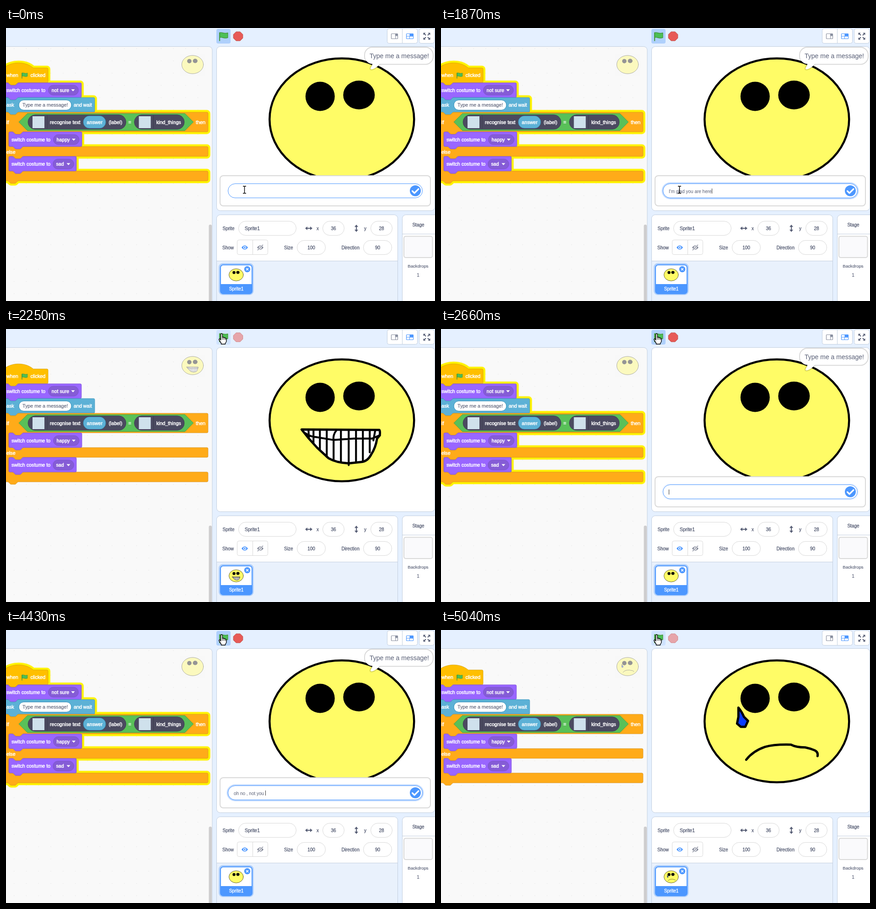
Write an HTML page with a canvas that moves like this. It is 938 by 597 pixels and loops after 5600 ms.

```html
<!DOCTYPE html>
<html lang="en">
<head>
<meta charset="utf-8">
<title>Message face</title>
<style>
html, body { margin: 0; width: 100%; height: 100%; overflow: hidden; background: #e5f0ff; }
canvas { display: block; }
</style>
</head>
<body>
<canvas id="stage" width="938" height="597"></canvas>
<script>
const ctx = document.getElementById('stage').getContext('2d');
const LOOP = 5600;
const FONT = '"Liberation Sans", Arial, sans-serif';
const BLUE = '#4c97ff', INK = '#575e75', EDGE = '#c3cfdf', LINE = '#d9d9d9';

// ---- timing ----
const HAPPY = 1950, RESTART = 2660, SAD = 4900;
const FIRST = [[70, 560, 7, "I'm gl"], [650, 1150, 7, 'ad you '], [1220, 1780, 8, 'are her'], [1870, 1870, 1, 'e']];
const SECOND = [[3170, 3170, 1, 'o'], [3260, 3800, 8, 'h no , '], [3870, 4430, 8, 'not you '], [4520, 4830, 5, 'again']];

// Number of evenly spaced steps reached at time t
function stepsDone(t, from, to, n) {
  if (t < from) return 0;
  if (n < 2) return n;
  return Math.min(n, 1 + Math.floor((t - from) / (to - from) * (n - 1) + 0.12));
}

function typed(t, runs) {
  return runs.map(([from, to, n, s]) =>
    s.slice(0, Math.max(0, stepsDone(t, from, to, n) - (n - s.length)))).join('');
}

// ---- drawing helpers ----
function paint(path, fill, stroke, width = 1) {
  if (fill) { ctx.fillStyle = fill; ctx.fill(path); }
  if (stroke) { ctx.strokeStyle = stroke; ctx.lineWidth = width; ctx.stroke(path); }
}

function box(x, y, w, h, r, fill, stroke, width) {
  const p = new Path2D();
  p.roundRect(x, y, w, h, r);
  paint(p, fill, stroke, width);
}

function oval(x, y, rx, ry, fill, stroke, width) {
  const p = new Path2D();
  p.ellipse(x, y, rx, ry, 0, 0, 7);
  paint(p, fill, stroke, width);
}

function shape(d, fill, stroke, width) {
  paint(new Path2D(d), fill, stroke, width);
}

function at(x, y, scale, draw) {
  ctx.save();
  ctx.translate(x, y);
  ctx.scale(scale, scale);
  draw();
  ctx.restore();
}

function text(s, x, cy, size, color, { align = 'left', heavy = 0 } = {}) {
  ctx.font = `${size}px ${FONT}`;
  ctx.textAlign = align;
  ctx.fillStyle = ctx.strokeStyle = color;
  ctx.fillText(s, x, cy + size * 0.35);
  if (heavy) {
    ctx.lineWidth = heavy;
    ctx.strokeText(s, x, cy + size * 0.35);
  }
}

const uiText = (s, x, cy, align = 'left', size = 10) => text(s, x, cy, size, INK, { align, heavy: 0.35 });
const blockText = (s, x, cy) => text(s, x, cy, 10.72, '#fff', { heavy: 0.5 });

function flag(x, y, scale) {
  at(x, y, scale, () => {
    shape('M2 3C6 0 10 6 19 3V13C10 16 6 10 2 13z', '#4cbf56', '#45993d', 1.3);
    shape('M2 2V20', null, '#45993d', 2);
  });
}

// ---- script blocks, in block units ----
const U = 0.67, LEFT = -4.7;
const NOTCH = 'c2 0 3 1 4 2l4 4c1 1 2 2 4 2h12c2 0 3-1 4-2l4-4c1-1 2-2 4-2';
const TAB = 'c-2 0-3 1-4 2l-4 4c-1 1-2 2-4 2h-12c-2 0-3-1-4-2l-4-4c-1-1-2-2-4-2';
const TOP = 'M0 4a4 4 0 0 1 4-4h8' + NOTCH;
const END = 'a4 4 0 0 1-4 4H48' + TAB + 'H4a4 4 0 0 1-4-4z';
const right = (w, down) => `H${w - 4}a4 4 0 0 1 4 4v${down}`;
const stack = w => TOP + right(w, 40) + END;
const hat = w => 'M0 0c25-22 71-22 96 0' + right(w, 40) + END;
const mouthGap = 'a4 4 0 0 1-4 4H64' + TAB + 'H20a4 4 0 0 0-4 4v40a4 4 0 0 0 4 4h8' + NOTCH;
const ifElse = w => TOP + right(w, 56) + mouthGap + right(w, 24) + mouthGap + right(w, 24) + END;
const units = px => px / U;

const PURPLE = ['#9966ff', '#774dcb'];
const BLOCKS = [
  [LEFT, 87.3, hat(units(96.7)), '#ffbf00', '#cc9900'],
  [LEFT, 119.8, stack(units(169.7)), ...PURPLE],
  [LEFT, 152, stack(units(198.7)), '#5cb1d6', '#2e8eb8'],
  [LEFT, 184.2, ifElse(units(446.5)), '#ffab19', '#cf8b17'],
  [6, 227.1, stack(units(160)), ...PURPLE],
  [6, 280.7, stack(units(148)), ...PURPLE]
];

// All blocks as one path, so that the soft glow does not add up
const OUTLINE = new Path2D();
for (const [x, y, d] of BLOCKS) OUTLINE.addPath(new Path2D(d), new DOMMatrix([U, 0, 0, U, x, y]));

function drawGlow() {
  paint(OUTLINE, null, 'rgba(255,242,0,0.4)', 10.8);
  paint(OUTLINE, null, '#fff200', 9.2);
}

function dropdown(x, cy, w, label) {
  box(x, cy - 11, w, 22, 11, '#855cd6', '#774dcb', 0.7);
  blockText(label, x + 7, cy);
  const tip = x + w - 12;
  shape(`M${tip - 4} ${cy - 2}h8l-4 4.5z`, '#fff');
}

function modelPill(x, w) {
  box(x, 189.8, w, 31.8, 15.9, '#4b4a60', '#3a394c', 0.7);
  box(x + 10, 193, 26, 26, 0, '#cfe1ec');
  shape(`M${x + 42} 191v29`, null, '#3c3b4e');
}

function drawBlocks(glow) {
  ctx.lineJoin = 'round';
  if (glow) drawGlow();
  for (const [x, y, d, fill, edge] of BLOCKS) at(x, y, U, () => shape(d, fill, edge, 1));

  blockText('when', 1, 103.5);
  flag(33.5, 96.5, 0.7);
  blockText('clicked', 53.5, 103.5);

  blockText('switch costume to', 1, 136);
  dropdown(92.5, 136, 66, 'not sure');

  blockText('ask', 1, 168.3);
  box(28, 157.5, 115, 22, 11, '#fff', '#2e8eb8', 1);
  text('Type me a message!', 36, 168.3, 10.72, INK, { heavy: 0.15 });
  blockText('and wait', 148, 168.3);

  blockText('if', 1, 206);
  shape('M28 205.6L46.8 186.9H391.2L409.8 205.6L391.2 224.4H46.8z', '#59c059', '#389438', 0.7);
  modelPill(48, 214.5);
  modelPill(280.5, 109.5);
  blockText('recognise text', 96, 206);
  box(169, 192.3, 49, 26.8, 13.4, '#5cb1d6', '#2e8eb8', 0.7);
  blockText('answer', 176.5, 206);
  blockText('(label)', 224.5, 206);
  blockText('=', 267.5, 206);
  blockText('kind_things', 328.5, 206);
  blockText('then', 415, 206);

  blockText('switch costume to', 12, 244);
  dropdown(103.5, 244, 56.5, 'happy');
  blockText('else', 1, 271);
  blockText('switch costume to', 12, 297.5);
  dropdown(102.5, 297.5, 46, 'sad');
}

// ---- the face, in stage pixels around its centre ----
function happyMouth() {
  shape('M-88 20L82 21Q84 24 83 33L77 40Q74 60 64 75Q56 90 43 91L15 94Q-12 93-29 83L-54 60L-72 40z', '#fff', '#000', 5);
  shape('M-80 28Q-70 36-54 37L-18 43L26 40L66 40L82 33M-73 21L-72 38M-62 22V50M-48 22V64M-33 22V80'
    + 'M-12 22Q-20 32-18 44V88M-2 22V92M15 22V98M31 22V92M46 22V88M61 22V70M73 22L69 44', null, '#000', 4.2);
}

function sadMouth() {
  shape('M-67 84Q-52 65-26 56Q-6 50 31 51Q42 57 62 57Q72 59 82 63Q91 67 89 76', null, '#000', 5);
  shape('M-84-30Q-76-20-72-10L-63-1L-69 12H-79L-87 5L-84-10z', '#0a3cff', '#000', 5);
}

function face(x, y, scale, mood, line = 4.5) {
  at(x, y, scale, () => {
    ctx.lineCap = ctx.lineJoin = 'round';
    oval(0, 0, 158, 133.3, '#fffc66', '#000', line);
    oval(-47.5, -50.2, 32, 32, '#000');
    oval(37.5, -53.2, 34.5, 31.5, '#000');
    if (mood === 'happy') happyMouth();
    if (mood === 'sad') sadMouth();
    ctx.lineCap = 'butt';
  });
}

// Faded as one picture so that overlapping parts do not add up
function fadedFace(mood) {
  face(408, 80, 0.15, mood, 5);
  ctx.globalAlpha = 0.6;
  ctx.fillStyle = '#f9f9f9';
  ctx.fillRect(380, 56, 56, 48);
  ctx.globalAlpha = 1;
}

// ---- panels ----
function workspace(mood, running) {
  box(-10, 40.5, 461, 580, 8, '#f9f9f9', EDGE);
  ctx.fillStyle = '#e2e2e2';
  for (let x = 17; x < 445; x += 26.8)
    for (let y = 44.5; y < 597; y += 26.8) ctx.fillRect(x, y, 1.2, 1.2);
  fadedFace(mood);
  drawBlocks(running);
  box(443.5, 430, 6.5, 180, 3, '#cecdce');
}

function header(running, hover) {
  if (running || hover) box(460, 2, 31, 32, 4, running ? '#afd0fc' : '#d0e3ff');
  flag(465, 7.5, 1.05);
  ctx.globalAlpha = running ? 1 : 0.5;
  shape('M503.2 8.2h8.6l6 6v7.8l-6 6h-8.6l-6-6v-7.8z', '#e75a56', '#c04d49', 1);
  ctx.globalAlpha = 1;

  box(833.5, 1.5, 66, 32, 4, '#fff', EDGE);
  shape('M866.5 2v31', null, EDGE);
  box(842.5, 12.5, 14, 11, 1, '#fff', '#8a90a0', 1.2);
  shape('M851.5 13v10', null, '#8a90a0');
  box(852, 13, 4.5, 4.5, 0, '#8a90a0');
  box(875.5, 12.5, 15, 11, 1, '#fff', BLUE, 1.2);
  box(882.5, 12.5, 8, 5.5, 0, BLUE);
  shape('M876 18h14M882.5 18v5', null, BLUE);
  box(903.5, 1.5, 33, 32, 4, '#fff', EDGE);
  for (const sx of [-1, 1]) for (const sy of [-1, 1]) {
    ctx.save();
    ctx.translate(920, 18);
    ctx.scale(sx, sy);
    shape('M2 2L6 6', null, INK, 2);
    shape('M7.5 2.5V7.5H2.5z', INK);
    ctx.restore();
  }
}

function askPanel(value, focus, caret) {
  box(468, 323, 460, 66, 7, '#fff', LINE, 2);
  if (focus > 0) {
    ctx.globalAlpha = focus;
    box(482.5, 337.5, 431, 37, 18.5, '#c0daff');
    ctx.globalAlpha = 1;
  }
  box(485.5, 340.5, 425, 31, 15.5, '#fff', BLUE);
  text(value, 498, 357, 10, INK);
  if (caret) {
    const x = Math.round(498 + ctx.measureText(value).width);
    ctx.fillStyle = '#333';
    ctx.fillRect(x, 351, 1, 11);
  }
  oval(895, 356, 12, 12, BLUE);
  ctx.lineCap = 'round';
  shape('M888.5 356.5l4.5 4.5l9-9', null, '#fff', 3.2);
  ctx.lineCap = 'butt';
}

function bubble() {
  const d = 'M801 43H917A16 16 0 0 1 933 59V62.5A16 16 0 0 1 917 78.5H817C812 86.5 802 90.5 799 90.5'
    + 'A2 2 0 0 1 797 88.5C797 86.5 801 82.5 801 78.5A16 16 0 0 1 785 62.5V59A16 16 0 0 1 801 43z';
  shape(d, null, 'rgba(0,0,0,0.15)', 4);
  shape(d, '#fff');
  text('Type me a message!', 795, 61, 14, INK);
}

function stagePanel(mood, running, ask) {
  box(460.5, 40.5, 477, 359, 8, '#fff', EDGE);
  face(734.3, 199.7, 1, mood);
  if (!running) return;
  askPanel(ask.value, ask.focus, ask.caret);
  bubble();
}

function field(x, cy, w, value, align) {
  box(x + 0.5, cy - 15.5, w, 31, 15.5, '#fff', LINE);
  if (align === 'left') uiText(value, x + 14, cy, 'left', 10.4);
  else uiText(value, x + w / 2 + 0.5, cy, 'center');
}

function arrows(x, y, turn) {
  ctx.save();
  ctx.translate(x, y);
  ctx.rotate(turn);
  shape('M-5 0H5', null, INK, 2);
  shape('M-8 0L-3-4V4zM8 0L3-4V4z', INK);
  ctx.restore();
}

function eye(x, y, color, off) {
  shape(`M${x - 7} ${y}Q${x} ${y - 9} ${x + 7} ${y}Q${x} ${y + 9} ${x - 7} ${y}z`, color);
  oval(x, y, 3.1, 3.1, '#fff');
  oval(x, y, 1.8, 1.8, color);
  if (off) {
    shape(`M${x - 5} ${y + 5}L${x + 6} ${y - 6}`, null, '#fff', 3);
    shape(`M${x - 6} ${y + 6}L${x + 6} ${y - 6}`, null, color, 1.4);
  }
}

function spritePanel(mood) {
  box(460.5, 408.5, 396, 210, 8, '#e9f1fc', EDGE);
  box(461, 409, 395, 100, [8, 8, 0, 0], '#fff');
  shape('M461 509.5H856', null, EDGE);
  uiText('Sprite', 473.5, 438.5);
  field(508, 438, 126, 'Sprite1', 'left');
  arrows(662, 438, 0);
  uiText('x', 679, 438.5);
  field(692, 438, 47, '36');
  arrows(766, 438, Math.PI / 2);
  uiText('y', 783, 438.5);
  field(797, 438, 47, '28');

  uiText('Show', 473, 480.5);
  box(505.5, 463.5, 67, 32, 4, '#fff', LINE);
  shape('M539.5 464v32', null, LINE);
  eye(522, 480, BLUE);
  eye(556, 480, '#858a9a', true);
  uiText('Size', 608, 480.5);
  field(636, 480, 62, '100');
  uiText('Direction', 733.5, 480.5);
  field(781, 480, 62, '90');

  box(465, 514, 76.5, 70, 9, '#b0d0fc');
  box(469, 518, 69, 63, 6, '#fff', BLUE, 2);
  box(469, 560, 69, 21, [0, 0, 6, 6], BLUE);
  text('Sprite1', 503.5, 570, 10, '#fff', { align: 'center', heavy: 0.35 });
  face(503.3, 539.8, 0.1, mood, 6);
  oval(527.5, 527.5, 6.7, 6.7, BLUE);
  shape('M525 525l5 5M530 525l-5 5', null, '#fff', 1.5);
}

function backdropPanel() {
  box(866.5, 408.5, 80, 210, 8, '#fff', EDGE);
  shape('M867 450.5H938', null, EDGE);
  uiText('Stage', 901.5, 430, 'center');
  box(870, 455.5, 62.5, 46.5, 4, '#fafafc', LINE, 2);
  text('Backdrops', 901, 520.5, 9.6, INK, { align: 'center', heavy: 0.15 });
  text('1', 901, 540, 10, INK, { align: 'center', heavy: 0.15 });
}

// ---- mouse pointer ----
const POINTERS = {
  beam() {
    const d = 'M-3.5-7.5H-1Q0-7.5 0-6Q0-7.5 1-7.5H3.5M0-6V6.5M-3.5 8H-1Q0 8 0 6.5Q0 8 1 8H3.5';
    shape(d, null, '#000', 1.4);
  },
  arrow() {
    shape('M0 0V16L4 12.5L6.5 18L9 17L6.5 11.5H11.5z', '#fff', '#000', 1);
  },
  hand() {
    shape('M-3.8-9Q-2-12-.2-9V-2Q1.7-3.8 3-1.3Q5-2.6 6.2-.3Q8.4-1 8.4 2V6Q8 9 6 10.5V12.5H-3V10.5'
      + 'L-7.5 3.5Q-8.5 1-6 1L-3.8 3.5z', '#fff', '#000', 1.4);
    shape('M-.2-2V3M3-1.3V3M6.2 0V3.5', null, '#000', 1);
  }
};

function pointer(t) {
  const k = Math.max(0, stepsDone(t, HAPPY, 2250, 5) - 1) / 4;
  const ease = k * k * (3 - 2 * k);
  const kind = t < HAPPY ? 'beam' : ease < 0.97 ? 'arrow' : 'hand';
  return { kind, x: 521.5 - 48 * ease, y: 353.5 - 333 * ease };
}

// ---- whole picture ----
function draw(t) {
  const running = t < HAPPY || (t >= RESTART && t < SAD);
  const mood = running ? 'unsure' : t < RESTART ? 'happy' : 'sad';
  const again = t >= RESTART;
  const focusAt = again ? RESTART : 70;
  const ask = {
    value: typed(t, again ? SECOND : FIRST),
    focus: Math.min(1, Math.max(0, (t - focusAt + 60) / 250)) * (t >= focusAt),
    caret: t >= focusAt
  };
  const mouse = pointer(t);

  ctx.fillStyle = '#e5f0ff';
  ctx.fillRect(0, 0, 938, 597);
  workspace(mood, running);
  header(running, mouse.kind === 'hand');
  stagePanel(mood, running, ask);
  spritePanel(mood);
  backdropPanel();
  at(mouse.x, mouse.y, 1, POINTERS[mouse.kind]);
}

const start = performance.now();
function tick() {
  draw((performance.now() - start) % LOOP);
  requestAnimationFrame(tick);
}
tick();
</script>
</body>
</html>
```
